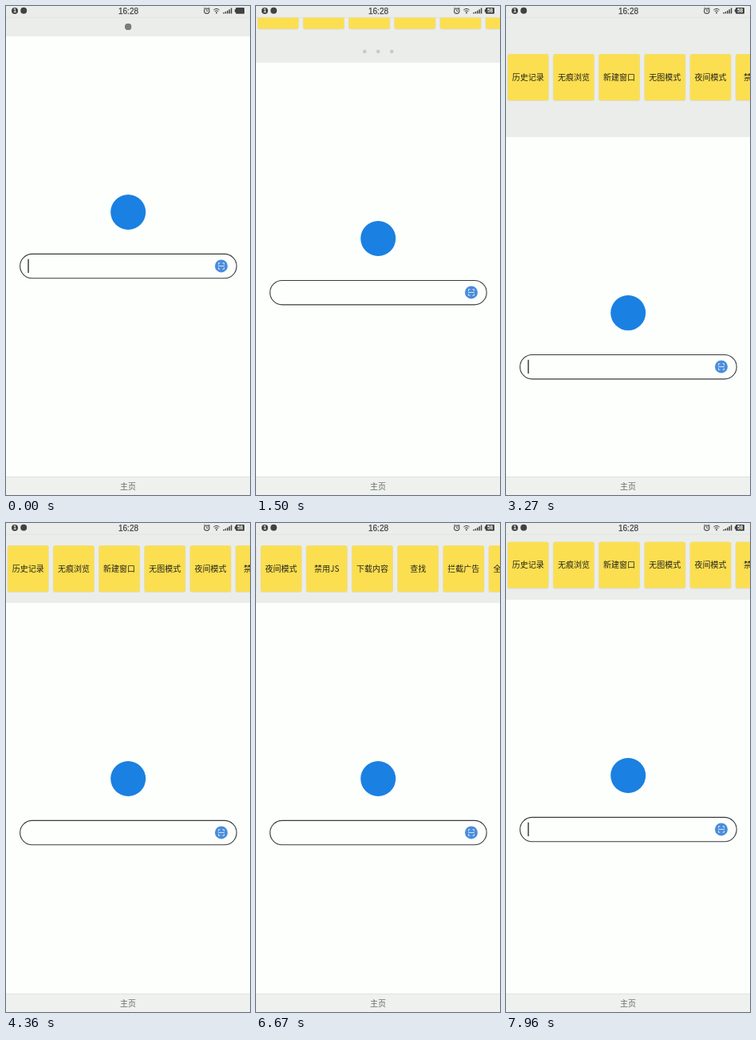
Recreate the animation shown at these times as an HTML page. Size 306 by 612 pixels, loop 8000 ms.

```html
<!DOCTYPE html>
<html lang="zh">
<head>
<meta charset="utf-8">
<style>
  html, body { margin: 0; width: 100%; height: 100%; overflow: hidden; background: #fcfffc; }
  svg { display: block; width: 306px; height: 612px; }
  text { font: 10px "Noto Sans CJK SC", "Noto Sans CJK", sans-serif; text-anchor: middle; }
  .card text { font-weight: 500; fill: #26241a; }
  .line { fill: none; stroke: #414342; }
  .dark { fill: #414342; }
  #clock { font: 10px "Liberation Sans", Arial, sans-serif; stroke: #414342; stroke-width: .25; }
  .tiny { font: bold 6.5px "Liberation Sans", Arial, sans-serif; fill: #fff; }
</style>
</head>
<body>
<svg viewBox="0 0 306 612">
  <rect width="306" height="612" fill="#fcfffc"/>
  <rect id="panel" width="306" fill="#ebedeb"/>
  <g id="dots" fill="#7b7d7c"><circle/><circle/><circle/></g>
  <g id="cards"></g>

  <g id="page">
    <circle cx="153.2" cy="220" r="22" fill="#1a80e2"/>
    <rect x="17.6" y="272.4" width="271.6" height="30.4" rx="15.2" fill="#fdfffd" stroke="#3a3c3b" stroke-width="1.1"/>
    <rect id="cursor" x="27.3" y="278.7" width="1.4" height="17.3" fill="#333"/>
    <circle cx="270" cy="287.4" r="8" fill="#4a8cdb"/>
    <path d="M266.5 285.7v-2h2M271.5 283.7h2v2M273.5 289.2v2h-2M268.5 291.2h-2v-2M266 287.4h8" fill="none" stroke="#e8f2ff" stroke-width=".9"/>
  </g>

  <rect id="status" width="306" height="14"/>
  <path d="M0 14.3H306" stroke="#dfe1df" stroke-width=".7"/>
  <circle class="dark" cx="11" cy="6" r="4"/>
  <text class="tiny" x="11" y="8.2">1</text>
  <circle class="dark" cx="22.2" cy="5.8" r="4"/>
  <text id="clock" class="dark" x="153.5" y="9.6">16:28</text>
  <g class="line">
    <circle cx="251.8" cy="6.2" r="3.2" stroke-width="1.1"/>
    <path d="M251.8 4.2v2.2h1.6M248 3.4l1.7-1.5M255.6 3.4l-1.7-1.5" stroke-width=".9"/>
    <path d="M260.3 5q3.7-3.2 7.4 0M261.7 6.7q2.3-2 4.6 0" stroke-width="1"/>
    <path d="M273 9.5v-1.6M275.4 9.5v-2.5M277.8 9.5v-3.7M280.2 9.5v-5.2M282.6 9.5v-7" stroke-width="1.5"/>
  </g>
  <circle class="dark" cx="264" cy="8.5" r="1"/>
  <rect class="dark" x="288" y="2" width="11" height="7.8" rx="1"/>
  <rect class="dark" x="286.8" y="4.2" width="1.5" height="3.4"/>
  <text id="charge" class="tiny" x="293.5" y="8.2">58</text>

  <rect y="589" width="306" height="23" fill="#eff1ee"/>
  <path d="M0 589.4H306" stroke="#dcdedc" stroke-width=".8"/>
  <text x="153" y="605.3" fill="#666866">主页</text>
</svg>
<script>
  const LOOP = 8000, OPEN = 100, CLOSED = 38, PITCH = 57.2;
  const $ = id => document.getElementById(id);
  const set = (el, attrs) => { for (const k in attrs) el.setAttribute(k, attrs[k]); };
  const show = (id, on) => set($(id), { opacity: on ? 1 : 0 });
  const linear = u => u;
  const smooth = u => u * u * (3 - 2 * u);
  const easeOut = u => 1 - (1 - u) ** 3;

  // Keys are [time, value, easing towards this key].
  function track(keys, t, ease = linear) {
    const i = keys.findIndex(k => k[0] > t);
    if (i < 0) return keys[keys.length - 1][1];
    if (!i) return keys[0][1];
    const [t0, a] = keys[i - 1], [t1, b, e = ease] = keys[i];
    return a + (b - a) * e((t - t0) / (t1 - t0));
  }

  const pull = [[60, CLOSED], [810, 54.5], [1500, 71], [1650, 75.5], [2490, 115], [3270, 164],
    [3620, 186], [3960, OPEN, easeOut], [7720, OPEN], [7960, 96], [8000, 95]];
  const scroll = [[5200, 0], [6230, 268], [6355, 268], [7600, 0]];
  const chargeOn = [[800, 2400], [3150, 4700], [5500, 7000], [7750, 8000]];

  const names = ['历史记录', '无痕浏览', '新建窗口', '无图模式', '夜间模式',
    '禁用JS', '下载内容', '查找', '拦截广告', '全屏模式'];
  $('cards').innerHTML = names.map((name, i) => `
    <g class="card" transform="translate(${2.2 + i * PITCH})">
      <rect x="-.6" y="-.3" width="52.2" height="59" rx="3" fill="#dddccf"/>
      <rect width="51" height="57.6" rx="2.5" fill="#fbdf50"/>
      <text x="25.5" y="32.6">${name}</text>
    </g>`).join('');

  // Cards trail behind while opening, then stay centred when overstretched.
  function cardTop(h) {
    const u = OPEN - h;
    return u > 0 ? 28.3 - u - 28.5 * (u / 29) ** 2 : h / 2 - 21.7;
  }

  function draw(t) {
    const h = track(pull, t);
    set($('panel'), { height: h });
    set($('page'), { transform: `translate(0 ${h})` });
    set($('cards'), { transform: `translate(${-track(scroll, t, smooth)} ${cardTop(h)})` });

    const p = (h - CLOSED) / 33, q = Math.min(p, 1);
    const fade = t < 5000 ? Math.max(0, 1 - .68 * p) : 0;
    set($('dots'), { opacity: h < OPEN ? fade : 0 });
    [...$('dots').children].forEach((dot, i) =>
      set(dot, { cx: 153.2 + (i - 1) * 17 * q, cy: h - 12 - 2 * q, r: 4 - 1.7 * q }));

    // The bar keeps a yellow tint after the cards pass beneath it.
    set($('status'), { fill: t > 1600 && t < 2620 ? '#f2e7ae' : '#ebedeb' });
    show('cursor', (t + 140) % 1000 < 500);
    show('charge', chargeOn.some(([a, b]) => t >= a && t < b));
  }

  const start = performance.now();
  function tick() {
    draw((performance.now() - start) % LOOP);
    requestAnimationFrame(tick);
  }
  tick();
</script>
</body>
</html>
```
